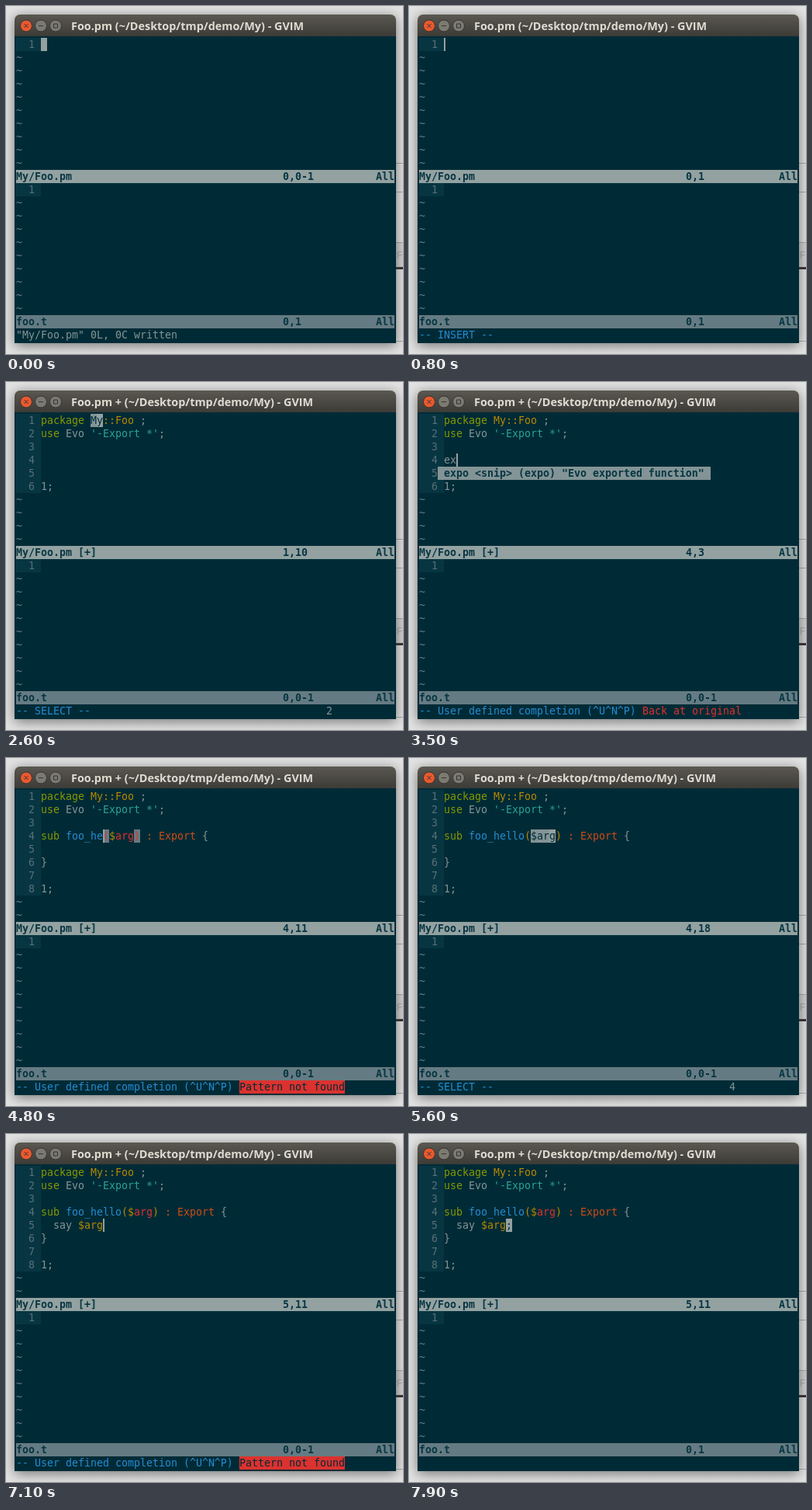
Write an HTML page with a canvas that moves like this. It is 512 px wide and 448 px high and loops after 8 s.

```html
<!DOCTYPE html>
<html>
<head>
<meta charset="utf-8">
<style>
html, body { margin: 0; width: 512px; height: 448px; overflow: hidden; }
canvas { display: block; }
</style>
</head>
<body>
<canvas width="512" height="448"></canvas>
<script>
const ctx = document.querySelector('canvas').getContext('2d');
const LOOP = 8000, CELL = 8, ROW = 17, LEFT = 13, TOP = 41, GUTTER = 4;
const C = {
  bg: '#002b36', gutter: '#073642', number: '#586e75', tilde: '#657b83',
  w: '#839496', bright: '#93a1a1', g: '#859900', y: '#b58900',
  o: '#cb4b16', r: '#dc322f', b: '#268bd2', c: '#2aa198'
};

// "|x" inside a line switches to colour C.x
const plain = s => s.replace(/\|./g, '');
const PACKAGE = '|gpackage |yMy::Foo|w ;';
const USE = "|guse|w Evo |c'-Export *'|w;";
const SUB = '|gsub |b', ARGS = '|y($|rarg|y)|o : Export|w {';
const HELLO = SUB + 'foo_hello' + ARGS;

const menus = {
  mo: ['module   <snip> (module) "Evo module package"', 'modeline <snip> (modeline) "Vim modeline"'],
  ex: ['expo <snip> (expo) "Evo exported function"'],
  sa: ['strwar <snip> (strwar)'],
  ar: ['arg  [ro]', 'sarg <snip> (sarg)']
};
menus.mod = menus.mo;

const INSERT = { note: '-- INSERT --', tint: C.b };
const COMPLETE = '-- User defined completion (^U^N^P) ';

// Timeline: each step inherits everything from the one before
const steps = [];
let last = {};
function at(t, patch) {
  last = { ...last, extra: '', menu: null, sel: 0, ...patch, t };
  steps.push(last);
}
function withLine(row, text) {
  return last.lines.map((line, i) => i === row ? text : line);
}
function type(t, gap, row, before, word, after = '') {
  for (let i = 1; i <= word.length; i++) {
    const typed = word.slice(0, i), menu = menus[typed];
    const col = plain(before + typed).length;
    const status = i < 2 ? INSERT
      : { note: COMPLETE, tint: C.b, extra: menu ? 'Back at original' : 'Pattern not found' };
    at(t + (i - 1) * gap, {
      lines: withLine(row, before + typed + after), row, col, mode: 'insert', ruler: '',
      menu, menuCol: col - i, ...status
    });
  }
}
function select(t, row, col, sel) {
  at(t, { row, col: col + sel - 1, sel, mode: 'select', note: '-- SELECT --', tint: C.b });
}

at(0, { lines: [''], row: 0, col: 0, mode: 'normal', ruler: '0,0-1', low: '0,1',
  note: '"My/Foo.pm" 0L, 0C written', tint: C.w });
at(700, { mode: 'insert', ruler: '0,1', ...INSERT });
type(1000, 150, 0, '', 'mod');
at(1700, { lines: ['module'], col: 6, menu: menus.mo, menuCol: 0, note: COMPLETE, extra: 'match 1 of 2' });
last = { ...last, lines: [PACKAGE, USE, '', '', '', '1;'], low: '0,0-1' };
select(2000, 0, 8, 2);
at(2900, { row: 3, col: 0, mode: 'insert', ...INSERT });
type(3200, 200, 3, '', 'ex');
at(3700, { lines: withLine(3, 'expo'), col: 4, menu: menus.ex, menuCol: 0, note: COMPLETE, extra: 'The only match' });
last = { ...last, lines: [PACKAGE, USE, '', SUB + 'name' + ARGS, '', '}', '', '1;'] };
select(3900, 3, 4, 4);
type(4200, 120, 3, SUB, 'foo_hello', ARGS);
select(5400, 3, 14, 4);
at(5700, { lines: withLine(4, '  '), row: 4, col: 2, mode: 'insert', ...INSERT });
type(6000, 200, 4, '  ', 'sa');
type(6400, 100, 4, '  sa', 'y ');
type(6700, 100, 4, '  say |y', '$');
type(6800, 120, 4, '  say |y$', 'arg');
type(7250, 100, 4, '  say |y$arg|w', ';');
at(7500, { col: 10, mode: 'normal', note: '', low: '0,1' });

function cells(col, row, count, color) {
  ctx.fillStyle = color;
  ctx.fillRect(LEFT + col * CELL, TOP + row * ROW, count * CELL, ROW);
}
function put(col, row, text, color, bold = '') {
  ctx.font = `${bold} 13.29px "DejaVu Sans Mono", monospace`;
  ctx.fillStyle = color;
  ctx.fillText(text, LEFT + col * CELL, TOP + 13 + row * ROW);
}
function code(row, line) {
  let col = GUTTER;
  line.split('|').forEach((part, i) => {
    const text = i ? part.slice(1) : part;
    put(col, row, text, i ? C[part[0]] : C.w);
    col += text.length;
  });
}
function pane(top, height, lines) {
  for (let i = 0; i < height; i++) {
    if (i < lines.length) {
      cells(0, top + i, GUTTER, C.gutter);
      put(2, top + i, i + 1, C.number);
      code(top + i, lines[i]);
    } else put(0, top + i, '~', C.tilde);
  }
}
function statusBar(row, name, ruler, color) {
  cells(0, row, 61, color);
  put(0, row, name, C.gutter, 'bold');
  put(43, row, ruler, C.gutter, 'bold');
  put(58, row, 'All', C.gutter, 'bold');
}
function cursor({ row, col, mode, sel, lines }) {
  const text = plain(lines[row]), x = GUTTER + col;
  const swap = (c, back, front) => {
    cells(GUTTER + c, row, 1, back);
    put(GUTTER + c, row, text[c] || '', front);
  };
  if (mode === 'insert') {
    if (text[col] === '(') [col, text.indexOf(')')].forEach(c => swap(c, C.tilde, C.r));
    ctx.fillStyle = C.bright;
    ctx.fillRect(LEFT + x * CELL, TOP + row * ROW, 2, ROW);
  } else {
    for (let i = 0; i < (sel || 1); i++) swap(col - i, i ? C.w : C.bright, C.bg);
  }
}
function popup({ menu, menuCol, row }) {
  const width = Math.max(...menu.map(s => s.length)) + 2;
  menu.forEach((item, i) => {
    cells(GUTTER + menuCol - 1, row + 1 + i, width, C.w);
    put(GUTTER + menuCol, row + 1 + i, item, C.gutter, 'bold');
  });
}
function message({ note, tint, extra, sel }) {
  put(0, 22, note, tint);
  if (sel) put(50, 22, sel, C.w);
  const failed = extra === 'Pattern not found';
  if (failed) cells(36, 22, extra.length, C.r);
  put(36, 22, extra, failed ? C.bg : C.r);
}

function fill(x, y, w, h, color) {
  ctx.fillStyle = color;
  ctx.fillRect(x, y, w, h);
}
function button(x, color, glyph) {
  ctx.beginPath();
  ctx.arc(x, 25.5, 7.5, 0, 7);
  ctx.fillStyle = color;
  ctx.fill();
  ctx.strokeStyle = '#34332f';
  ctx.lineWidth = 1;
  ctx.stroke();
  ctx.stroke(new Path2D(`M${x} 25.5${glyph}`));
}
function frame(title) {
  fill(0, 0, 512, 448, '#e2e2e2');
  fill(503, 304, 9, 34, '#d2d2d2');
  for (const y of [202, 239, 304, 431]) fill(503, y, 9, 1, '#a8a8a8');
  ctx.font = '12px "Liberation Sans", sans-serif';
  ctx.fillStyle = '#aaa';
  ctx.fillText('F', 504, 325);

  ctx.save();
  ctx.shadowColor = 'rgba(0,0,0,.5)';
  ctx.shadowBlur = 16;
  ctx.shadowOffsetY = 3;
  const bar = ctx.createLinearGradient(0, 11, 0, 39);
  bar.addColorStop(0, '#5a5850');
  bar.addColorStop(1, '#3c3b37');
  ctx.fillStyle = bar;
  ctx.beginPath();
  ctx.roundRect(11, 11, 492, 423, [7, 7, 0, 0]);
  ctx.fill();
  ctx.restore();
  fill(503, 336, 9, 3, '#3a3030');
  fill(11, 39, 492, 395, C.bg);

  button(26, '#e9592f', 'm-2.5-2.5l5 5m0-5l-5 5');
  button(45, '#7b7a72', 'm-3 0h6');
  button(64, '#7b7a72', 'm-2.5-2.5h5v5h-5z');
  ctx.font = 'bold 14.4px "Open Sans", "Noto Sans", sans-serif';
  ctx.fillStyle = '#dfdbd2';
  ctx.fillText(title, 84, 31);
}

function draw(now) {
  const t = now % LOOP;
  const s = steps.findLast(step => step.t <= t) || steps[0];
  const changed = s.t > 700;
  frame(`Foo.pm ${changed ? '+ ' : ''}(~/Desktop/tmp/demo/My) - GVIM`);
  pane(0, 10, s.lines);
  cursor(s);
  if (s.menu) popup(s);
  statusBar(10, 'My/Foo.pm' + (changed ? ' [+]' : ''), s.ruler || `${s.row + 1},${s.col + 1}`, C.bright);
  pane(11, 10, ['']);
  statusBar(21, 'foo.t', s.low, C.tilde);
  message(s);
}
function tick() {
  draw(performance.now());
  requestAnimationFrame(tick);
}
tick();
</script>
</body>
</html>
```
